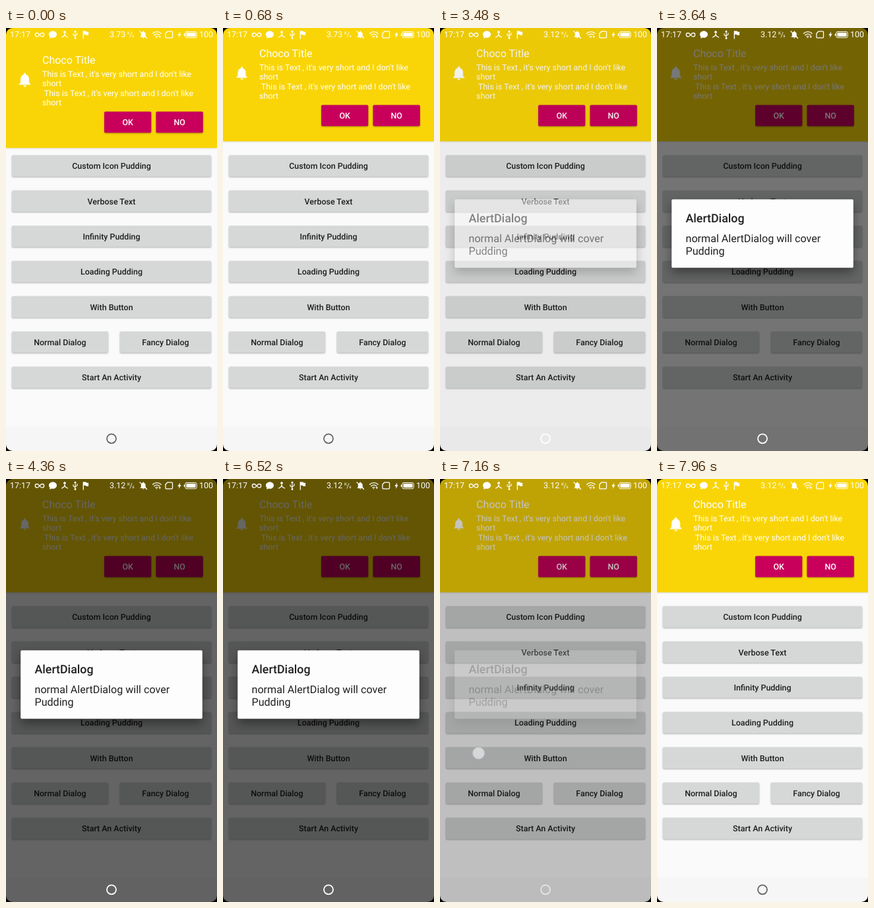
An HTML page for the animation above (8000 ms loop, 320x640 px).

```html
<!DOCTYPE html>
<html lang="en">
<head>
<meta charset="utf-8">
<title>Pudding demo</title>
<style>
  html, body { margin: 0; width: 100%; height: 100%; overflow: hidden; background: #000; }
  svg { display: block; width: 100vw; height: 100vh; }
  text { font-family: Roboto, "Noto Sans", sans-serif; font-size: 12.44px; white-space: pre; text-rendering: geometricPrecision; }
  .mid { text-anchor: middle; font-weight: 500; }
  .btn { filter: drop-shadow(0 1px 1px rgba(0, 0, 0, .3)); }
  .btn text { fill: #1e1e1e; }
  .line { fill: none; stroke: #fff; stroke-width: 1.3; stroke-linecap: round; stroke-linejoin: round; }

  .panel, .bell, .dim, .dialog, .press, .tap1, .tap2, .home, .speed1, .speed2 {
    animation: 8s linear infinite;
  }
  .panel { animation-name: settle; filter: drop-shadow(0 1px 1px rgba(0, 0, 0, .12)); }
  .bell { animation-name: pulse; animation-timing-function: ease-in-out; }
  .dim { animation-name: dim; }
  .dialog { animation-name: dialog; }
  .card { filter: drop-shadow(0 7px 8px rgba(0, 0, 0, .4)); }
  .press { animation-name: press; }
  .tap1 { animation-name: tap1; }
  .tap2 { animation-name: tap2; }
  .home { animation-name: home; }
  .speed1 { animation-name: speed1; }
  .speed2 { animation-name: speed2; }

  @keyframes settle {
    0% { transform: translateY(10px); animation-timing-function: cubic-bezier(.3, 0, .4, 1); }
    3.5%, 100% { transform: none; }
  }
  @keyframes pulse {
    0%, 40%, 74.5%, 100% { transform: scale(1.085); }
    19%, 59.5%, 87.5% { transform: scale(.895); }
  }
  @keyframes dim {
    0%, 43.29% { opacity: 0; }
    45.79%, 88.375% { opacity: .6; }
    90.25%, 100% { opacity: 0; }
  }
  @keyframes dialog {
    0% { opacity: 0; }
    43.125% { opacity: 0; animation-timing-function: cubic-bezier(.215, .61, .355, 1); }
    45% { opacity: 1; }
    88.725% { opacity: 1; animation-timing-function: cubic-bezier(.215, .61, .355, 1); }
    90.6%, 100% { opacity: 0; }
  }
  @keyframes press {
    0%, 25.5% { opacity: 0; }
    26.5%, 28% { opacity: .13; }
    30%, 100% { opacity: 0; }
  }
  @keyframes tap1 {
    0%, 25.49% { opacity: 0; }
    25.5%, 27.49% { opacity: 1; }
    27.5%, 100% { opacity: 0; }
  }
  @keyframes tap2 {
    0%, 87.99% { opacity: 0; }
    88%, 90.49% { opacity: 1; }
    90.5%, 100% { opacity: 0; }
  }
  @keyframes home {
    0%, 31.25% { stroke: #666; }
    32.75%, 89% { stroke: #fff; }
    92%, 100% { stroke: #666; }
  }
  @keyframes speed1 {
    0%, 24.99% { opacity: 1; }
    25%, 100% { opacity: 0; }
  }
  @keyframes speed2 {
    0%, 24.99% { opacity: 0; }
    25%, 100% { opacity: 1; }
  }
</style>
</head>
<body>
<svg viewBox="0 0 320 640" preserveAspectRatio="none">
  <defs>
    <path id="bell" d="M12 22c1.1 0 2-.9 2-2h-4c0 1.1.9 2 2 2zm6-6v-5c0-3.07-1.64-5.64-4.5-6.32V4c0-.83-.67-1.5-1.5-1.5s-1.5.67-1.5 1.5v.68C7.63 5.36 6 7.92 6 11v5l-2 2v1h16v-1l-2-2z"/>
    <g id="tap">
      <circle r="10" fill="#8d929c" fill-opacity=".45"/>
      <circle r="9" fill="#dcdcdc" fill-opacity=".92" stroke="#c3cbdc" stroke-width=".8"/>
    </g>
  </defs>

  <rect width="320" height="640" fill="#fafafa"/>
  <rect y="603" width="320" height="37" fill="#f6f6f6"/>
  <g id="list"></g>
  <rect class="press" x="8.9" y="459.2" width="146" height="32.2" rx="1.8"/>

  <g class="panel" fill="#fff">
    <rect y="-40" width="320" height="211.5" fill="#f9d507"/>
    <g transform="translate(28.5 68.5)">
      <g class="bell"><use href="#bell" x="-12" y="-12.25"/></g>
    </g>
    <text x="55" y="44" style="font-size:16px">Choco Title</text>
    <text x="55" y="63.6">This is Text , it's very short and I don't like</text>
    <text x="55" y="78.2">short</text>
    <text x="55" y="92.8"> This is Text , it's very short and I don't like</text>
    <text x="55" y="107.4">short</text>
    <g class="btn">
      <rect x="149" y="116.5" width="71.3" height="32" rx="1.8" fill="#c8005c"/>
      <rect x="227.5" y="116.5" width="71.3" height="32" rx="1.8" fill="#c8005c"/>
    </g>
    <text class="mid" x="184.7" y="137">OK</text>
    <text class="mid" x="263.2" y="137">NO</text>
  </g>

  <rect class="dim" width="320" height="640"/>

  <g class="dialog" fill="#202020">
    <rect class="card" x="22.2" y="259.3" width="275.6" height="103.4" rx="1.8" fill="#fdfdfd"/>
    <text x="43.5" y="294.3" style="font-size:17.78px;font-weight:500">AlertDialog</text>
    <text x="43.5" y="323.6" style="font-size:16.1px">normal AlertDialog will cover</text>
    <text x="43.5" y="342.5" style="font-size:16.1px">Pudding</text>
  </g>

  <!-- status bar -->
  <g fill="#fff">
    <text x="6" y="14.4">17:17</text>
    <path class="line" d="M51 10.3c-1.6-2-2.6-2.8-3.9-2.8a2.8 2.8 0 0 0 0 5.6c1.3 0 2.3-.8 3.9-2.8s2.6-2.8 3.9-2.8a2.8 2.8 0 0 1 0 5.6c-1.3 0-2.3-.8-3.9-2.8z"/>
    <path d="M71 4.6c3.4 0 6 2.3 6 5.1s-2.6 5.1-6 5.1l-1.7-.2-3.3 1.2.6-2.6c-1-.9-1.6-2.1-1.6-3.5 0-2.8 2.6-5.1 6-5.1z"/>
    <path class="line" d="M89 5v4.2c0 2.3-2 3.600-4.600 4.800M89 9.200c0 2.300 2 3.600 4.600 4.800M87.500 6.500 89 4.800l1.500 1.700"/>
    <path class="line" style="stroke-width:1.100" d="M105 4.500v11M102 8.500v2.300l3 2M108 7.500v2.300l-3 2M103.800 5.700 105 4l1.200 1.700"/>
    <circle cx="105" cy="15.500" r="1.400"/>
    <path class="line" d="M117.300 5v11"/>
    <path d="M117.300 4.600h4.200l.6 1.200h3v5.200h-3.600l-.6-1.200h-3.600z"/>
    <text class="speed1" x="157" y="14.400">3.73</text>
    <text class="speed2" x="157" y="14.400">3.12</text>
    <text x="184" y="10.300" style="font-size:6.500px">K</text>
    <path class="line" style="stroke-width:.8" d="M188 14.200 191 6.500"/>
    <text x="191.300" y="14" style="font-size:6.500px">s</text>
    <use href="#bell" transform="translate(201.300 3) scale(.58)"/>
    <path class="line" d="M203 5l10.500 10.500"/>
    <path class="line" d="M222.500 8.200a9 9 0 0 1 12.600 0M224.700 10.700a6 6 0 0 1 8.200 0M227 13.100a3 3 0 0 1 3 -.6"/>
    <path d="M227.300 14h2.600l-1.300 1.600zM231.500 12.200h3.400l-1.700 3.300z"/>
    <path class="line" d="M244.800 5.200h6.700a1 1 0 0 1 1 1v7.600a1 1 0 0 1-1 1h-8.600a1 1 0 0 1-1-1V8.200z"/>
    <path d="M264.300 5.200 260.300 11h2.200l-.8 4 4-5.800h-2.200z"/>
    <rect class="line" style="stroke-width:1" x="271.800" y="5.500" width="17.400" height="9.200" rx="2.200"/>
    <rect x="273.400" y="7.100" width="14.200" height="6" rx="1"/>
    <rect x="269.700" y="8.400" width="1.500" height="3.400" rx=".6"/>
    <text x="293" y="14.400">100</text>
  </g>

  <circle class="home" cx="160" cy="621.300" r="7" fill="none" stroke="#666" stroke-width="1.800"/>
  <g transform="translate(88 477)"><use class="tap1" href="#tap"/></g>
  <g transform="translate(58.500 414.700)"><use class="tap2" href="#tap"/></g>

  <!-- rounded screen corners -->
  <path fill-rule="evenodd" d="M0 0H320V640H0zM10 0A10 10 0 0 0 0 10V630A10 10 0 0 0 10 640H310A10 10 0 0 0 320 630V10A10 10 0 0 0 310 0z"/>
</svg>
<script>
  const list = document.getElementById('list');
  const button = (label, row, x = 8.9, w = 302.2) => {
    const y = 192.5 + row * 53.33;
    return `<g class="btn"><rect x="${x}" y="${y}" width="${w}" height="32.2" rx="1.8" fill="#d6d7d7"/>` +
      `<text class="mid" x="${x + w / 2}" y="${y + 20.7}">${label}</text></g>`;
  };
  list.innerHTML = [
    ...['Custom Icon Pudding', 'Verbose Text', 'Infinity Pudding', 'Loading Pudding', 'With Button']
      .map((label, row) => button(label, row)),
    button('Normal Dialog', 5, 8.9, 146),
    button('Fancy Dialog', 5, 172.8, 138.3),
    button('Start An Activity', 6)
  ].join('');
</script>
</body>
</html>
```
